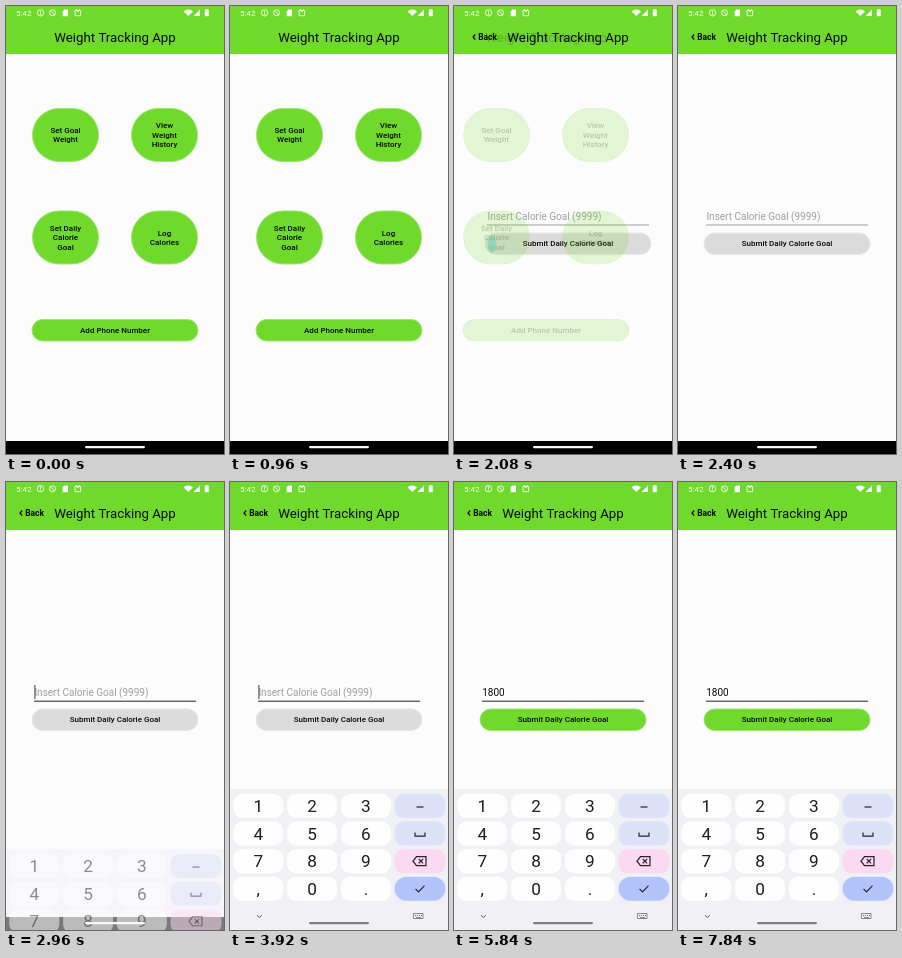
Animation of 218 by 448 pixels, one loop 8000 ms. Source, as an HTML page with a canvas:

```html
<!DOCTYPE html>
<html lang="en">
<head>
<meta charset="utf-8">
<title>Weight Tracking App</title>
<style>
html, body { margin: 0; width: 100%; height: 100%; overflow: hidden; background: #fdfcfd; }
canvas { display: block; width: 218px; height: 448px; }
</style>
</head>
<body>
<canvas id="stage" width="218" height="448"></canvas>
<script>
const ctx = document.getElementById('stage').getContext('2d');
const W = 218, H = 448, LOOP = 8000;
const GREEN = '#70da2c', PAGE = '#fdfcfd', INK = '#080808';
const SLIDE = { start: 1960, length: 450, distance: 22 };
const FOCUS = 2800;
const KEYS_IN = 320, KEYS_HEIGHT = 141;
const ENTRY = '1800', TYPED_AT = [4160, 4560, 5040, 5290];

const clamp = v => Math.max(0, Math.min(1, v));

function text(str, x, y, size, { weight = 400, color = INK, align = 'center' } = {}) {
  ctx.font = `${weight} ${size}px Roboto, sans-serif`;
  ctx.fillStyle = color;
  ctx.textAlign = align;
  ctx.textBaseline = 'alphabetic';
  ctx.fillText(str, x, y);
}

function rect(x, y, w, h, color) {
  ctx.fillStyle = color;
  ctx.fillRect(x, y, w, h);
}

function pill(x, y, w, h, r, fill, border) {
  ctx.beginPath();
  ctx.roundRect(x, y, w, h, r);
  ctx.fillStyle = fill;
  ctx.fill();
  if (border) {
    ctx.strokeStyle = border;
    ctx.lineWidth = 1;
    ctx.stroke();
  }
}

function line(points, color, width = 1, closed = false) {
  ctx.beginPath();
  points.forEach(([x, y]) => ctx.lineTo(x, y));
  if (closed) ctx.closePath();
  ctx.strokeStyle = color;
  ctx.lineWidth = width;
  ctx.stroke();
}

function polygon(points, color) {
  ctx.beginPath();
  points.forEach(([x, y]) => ctx.lineTo(x, y));
  ctx.closePath();
  ctx.fillStyle = color;
  ctx.fill();
}

function ring(x, y, r, color) {
  ctx.beginPath();
  ctx.arc(x, y, r, 0, Math.PI * 2);
  ctx.strokeStyle = color;
  ctx.lineWidth = 0.9;
  ctx.stroke();
}

function button(x, y, w, h, lines, fill = GREEN, border = '#9de36c') {
  pill(x + 0.5, y + 0.5, w - 1, h - 1, h / 2, fill, border);
  const top = y + h / 2 + 2.7 - (lines.length - 1) * 4.7;
  lines.forEach((s, i) => text(s, x + w / 2, top + i * 9.4, 8, { weight: 500 }));
}

// Draws a page's content shifted sideways and faded.
function layer(dx, alpha, content) {
  if (!alpha) return;
  ctx.save();
  ctx.globalAlpha = alpha;
  ctx.translate(dx, 0);
  content();
  ctx.restore();
}

function backdrop() {
  rect(0, 0, W, H, PAGE);
  rect(0, 0, W, 48, GREEN);
}

function title() {
  text('Weight Tracking App', 109, 36, 13.25);
}

function home() {
  title();
  button(26, 102, 67, 54, ['Set Goal', 'Weight']);
  button(125, 102, 67, 54, ['View', 'Weight', 'History']);
  button(26, 204.5, 67, 54, ['Set Daily', 'Calorie', 'Goal']);
  button(125, 204.5, 67, 54, ['Log', 'Calories']);
  button(25.5, 313, 167, 22.5, ['Add Phone Number']);
}

function calorieForm(t) {
  const focused = t >= FOCUS;
  const count = TYPED_AT.filter(at => t >= at).length;
  line([[16.2, 28.5], [14, 31], [16.2, 33.5]], INK, 1.2);
  text('Back', 19.2, 34, 8.4, { weight: 700, align: 'left' });
  title();

  if (count) text(ENTRY.slice(0, count), 28.2, 214, 10, { align: 'left' });
  else text('Insert Calorie Goal (9999)', 28.4, 214, 10, { color: '#a09ea0', align: 'left' });
  rect(28, 218.6, 162, focused ? 1.3 : 0.8, focused ? '#5b525c' : '#858287');

  const since = t - (count ? TYPED_AT[count - 1] : FOCUS);
  if (focused && since % 1000 < 500) rect(28.4 + count * 5.62, 203, 1, 14, '#493f4c');

  const colors = count ? [GREEN, '#9de36c'] : ['#dcdbdc', '#e8e7e8'];
  button(25.5, 226.5, 167, 22.5, ['Submit Daily Calorie Goal'], ...colors);
}

function ripple() {
  ctx.beginPath();
  ctx.ellipse(55, 238, 4.2, 9, 0, 0, Math.PI * 2);
  ctx.fillStyle = '#62d3b3';
  ctx.fill();
}

function statusBar() {
  const c = '#fbfef8';
  text('5:42', 10, 10, 8, { color: c, align: 'left' });
  ring(34.5, 6.8, 3.2, c);
  rect(34, 5, 1, 2.4, c);
  rect(34, 8, 1, 0.9, c);
  ring(46.5, 6.8, 3, c);
  line([[44.7, 4.8], [48.3, 8.8]], c, 0.9);
  polygon([[58.4, 3.4], [62, 3.4], [62, 10.2], [56.6, 10.2], [56.6, 5.2]], c);
  line([[69, 4.5], [74.6, 4.5], [74.6, 9.7], [69, 9.7]], c, 0.9, true);
  line([[70, 3], [71.8, 6], [73.6, 3]], c, 0.8);

  ctx.beginPath();
  ctx.moveTo(182.3, 10);
  ctx.arc(182.3, 10, 6.4, -Math.PI * 0.76, -Math.PI * 0.24);
  ctx.fillStyle = c;
  ctx.fill();
  polygon([[194, 3.5], [194, 10], [187.6, 10]], c);
  rect(198.8, 3.8, 4, 6.4, c);
  rect(199.8, 3, 2, 1, c);
}

function keyIcon(kind, x, y) {
  const c = '#23242d';
  if (kind === 'minus') line([[x - 3.5, y + 1], [x + 3.5, y + 1]], c, 1.2);
  if (kind === 'space') line([[x - 5, y - 1], [x - 5, y + 2.5], [x + 5, y + 2.5], [x + 5, y - 1]], c, 1.2);
  if (kind === 'enter') line([[x - 4.5, y], [x - 1.5, y + 3], [x + 4.5, y - 3.2]], c, 1.2);
  if (kind === 'erase') {
    line([[x - 7, y], [x - 3.5, y - 4.5], [x + 6, y - 4.5], [x + 6, y + 4.5], [x - 3.5, y + 4.5]], c, 1.2, true);
    line([[x - 1.3, y - 2.2], [x + 3.1, y + 2.2]], c, 1.2);
    line([[x + 3.1, y - 2.2], [x - 1.3, y + 2.2]], c, 1.2);
  }
}

const ROWS = [
  ['123', 'minus', '#dde1f8'],
  ['456', 'space', '#dde1f8'],
  ['789', 'erase', '#fbd9f1'],
  [',0.', 'enter', '#b3c4fd']
];

function keyboard() {
  rect(0, 307, W, KEYS_HEIGHT, '#f1f0f5');
  ROWS.forEach(([chars, icon, color], row) => {
    const y = 324 + row * 27.6;
    [...chars].forEach((ch, col) => {
      const x = 28.3 + col * 53.8;
      pill(x - 25, y - 12, 50, 24, 9, '#fefefe');
      text(ch, x, y + 6.2, 17.2, { color: '#1d1d22' });
    });
    pill(164.5, y - 12, 51, 24, icon === 'enter' ? 12 : 9, color);
    keyIcon(icon, 190, y);
  });
  line([[27, 433.2], [29.4, 435.6], [31.8, 433.2]], '#55565e', 1);
  line([[183.5, 431.5], [193, 431.5], [193, 436.5], [183.5, 436.5]], '#6c6d75', 0.8, true);
  for (let i = 0; i < 4; i++) rect(185 + i * 2, 433, 1, 1, '#6c6d75');
  rect(186, 435, 5, 0.8, '#6c6d75');
}

function bottomArea(t) {
  const shown = clamp((t - FOCUS) / KEYS_IN);
  rect(0, 435, W, 13, '#000');
  ctx.save();
  ctx.globalAlpha = shown;
  ctx.translate(0, KEYS_HEIGHT * Math.pow(1 - shown, 1.22));
  if (shown) keyboard();
  ctx.restore();
  pill(79, 440, 60, 2.2, 1.1, shown === 1 ? '#7f7f84' : '#f8f8f8');
}

function draw(t) {
  const p = clamp((t - SLIDE.start) / SLIDE.length);
  const left = -SLIDE.distance * (1 - Math.pow(1 - p, 4.7));
  const elapsed = t - SLIDE.start;
  backdrop();
  layer(SLIDE.distance + left, clamp(elapsed / 110), () => calorieForm(t));
  layer(left, 1 - clamp(elapsed / 150), home);
  layer(left, t >= 1920 && t < 2140 ? 0.5 : 0, ripple);
  statusBar();
  bottomArea(t);
}

const began = performance.now();
function frame() {
  draw((performance.now() - began) % LOOP);
  requestAnimationFrame(frame);
}
frame();
</script>
</body>
</html>
```
